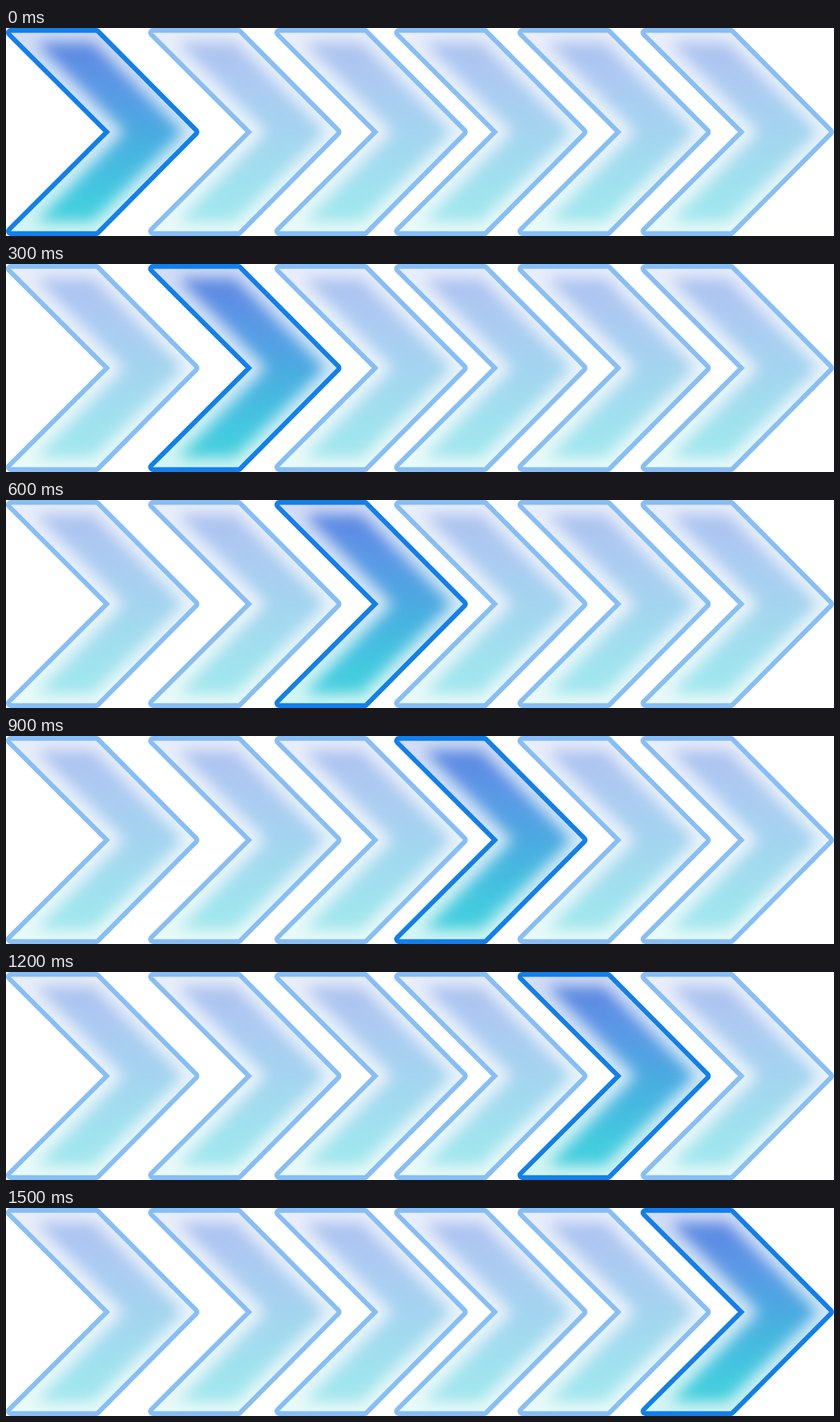
An HTML page that plays this animation: 1280x322 px, repeating every 1800 ms.

```html
<!DOCTYPE html>
<html lang="en">
<head>
<meta charset="utf-8">
<title>Chevrons</title>
<style>
  html, body { margin: 0; width: 100%; height: 100%; overflow: hidden; background: #fff; }
  svg { display: block; width: 1280px; height: 322px; }
</style>
</head>
<body>
<svg id="stage" viewBox="0 0 1280 322">
  <defs>
    <linearGradient id="pale" x1="0" y1="0" x2="0" y2="1">
      <stop offset="0" stop-color="#d2dcf6"/>
      <stop offset=".5" stop-color="#d6e9f8"/>
      <stop offset="1" stop-color="#d2f6f3"/>
    </linearGradient>
    <linearGradient id="deep" x1="0" y1="0" x2="0" y2="1">
      <stop offset="0" stop-color="#5c86e1"/>
      <stop offset=".22" stop-color="#5c96e6"/>
      <stop offset=".5" stop-color="#4aaae0"/>
      <stop offset=".85" stop-color="#42c9df"/>
      <stop offset="1" stop-color="#46d0dc"/>
    </linearGradient>
    <filter id="soft" x="-20%" y="-20%" width="140%" height="140%" color-interpolation-filters="sRGB">
      <feGaussianBlur stdDeviation="11"/>
    </filter>
    <path id="body" d="M7.4 7.4H139.5L291.5 161L139.5 314.6H7.4L161 161Z"/>
    <clipPath id="inside"><use href="#body"/></clipPath>
    <g id="chevron">
      <use href="#body" fill="#127fec" stroke="#127fec" stroke-width="14.7" stroke-linejoin="round"/>
      <use href="#body" fill="url(#pale)"/>
      <g clip-path="url(#inside)">
        <path d="M46 22H134L274 161L134 300H46L183 161Z" fill="url(#deep)" filter="url(#soft)"/>
      </g>
    </g>
  </defs>
</svg>
<script>
  const STEP = 300;
  const stage = document.getElementById("stage");
  const chevrons = [0, 219.7, 415, 600, 790.7, 981].map(x => {
    const el = document.createElementNS("http://www.w3.org/2000/svg", "use");
    el.setAttribute("href", "#chevron");
    el.setAttribute("x", x);
    return stage.appendChild(el);
  });

  const start = performance.now();
  function draw(now) {
    const lit = Math.floor(Math.max(0, now - start) / STEP) % chevrons.length;
    chevrons.forEach((el, i) => el.setAttribute("opacity", i === lit ? 1 : 0.5));
    requestAnimationFrame(draw);
  }
  draw(start);
</script>
</body>
</html>
```
